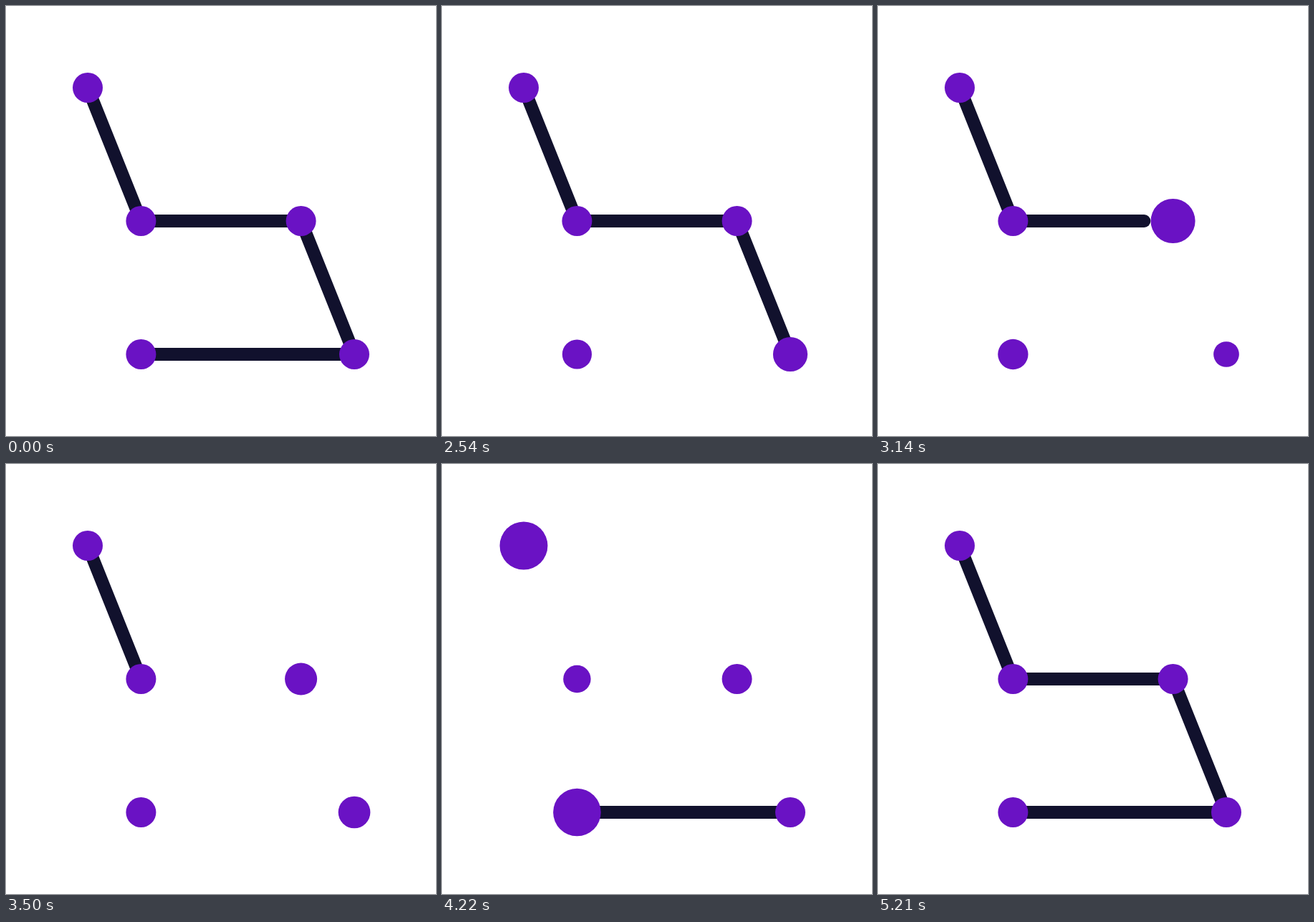
These frames come from a looping animation (600 by 600 pixels, 5.24 s). An HTML page with a canvas:

```html
<!DOCTYPE html>
<html lang="en">
<head>
<meta charset="utf-8">
<title>Linked dots</title>
<style>
  html, body { margin: 0; width: 100%; height: 100%; overflow: hidden; background: #fff; }
  canvas { display: block; width: 600px; height: 600px; }
</style>
</head>
<body>
<canvas id="stage" width="600" height="600"></canvas>
<script>
const ctx = document.getElementById('stage').getContext('2d');

const LOOP = 5240, HOLD = 2030, STEP = 30;
const RADIUS = 21, WIDTH = 18;
const DOT = '#6a12c4', LINE = '#11112d';

const nodes = [[188.4, 486], [486, 486], [411.6, 300], [188.4, 300], [114, 114]];
const pulseStarts = [[2007, 4010], [2507], [3003], [3505], [3945]];
const ERASE_TIME = 385;
const DRAW_START = 4005, DRAW_TIME = 700;

// Pulse keys: age in ms, scale
const pulse = [[0, 1], [250, 1.6], [640, 0.85], [860, 1.1], [1190, 1]];

const clamp = p => Math.min(1, Math.max(0, p));
const mix = (a, b, p) => a + (b - a) * p;
const quadOut = p => p * (2 - p);
const sineInOut = p => (1 - Math.cos(Math.PI * p)) / 2;
const cubicInOut = p => p < 0.5 ? 4 * p ** 3 : 1 - 4 * (1 - p) ** 3;

const segments = nodes.slice(1).map((b, i) => {
  const a = nodes[i];
  return { a, b, length: Math.hypot(b[0] - a[0], b[1] - a[1]) };
});
const total = segments.reduce((sum, s) => sum + s.length, 0);

function scaleAt(age) {
  const i = pulse.findIndex(key => key[0] > age);
  if (i < 1) return 1;
  const [t0, s0] = pulse[i - 1], [t1, s1] = pulse[i];
  const p = (age - t0) / (t1 - t0);
  return mix(s0, s1, i === 1 ? quadOut(p) : sineInOut(p));
}

function drawPart({ a, b }, from, to) {
  if (to <= from) return;
  ctx.beginPath();
  for (const p of [from, to]) ctx.lineTo(mix(a[0], b[0], p), mix(a[1], b[1], p));
  ctx.stroke();
}

function render(t) {
  ctx.fillStyle = '#fff';
  ctx.fillRect(0, 0, 600, 600);

  ctx.strokeStyle = LINE;
  ctx.lineWidth = WIDTH;
  ctx.lineCap = 'round';
  let reach = clamp((t - DRAW_START) / DRAW_TIME) * total;
  segments.forEach((s, i) => {
    if (t < DRAW_START) {
      drawPart(s, cubicInOut(clamp((t - pulseStarts[i][0]) / ERASE_TIME)), 1);
    } else {
      drawPart(s, 0, clamp(reach / s.length));
      reach -= s.length;
    }
  });

  ctx.fillStyle = DOT;
  nodes.forEach(([x, y], i) => {
    const start = pulseStarts[i].filter(s => s <= t).pop() ?? Infinity;
    ctx.beginPath();
    ctx.arc(x, y, RADIUS * scaleAt(t - start), 0, 2 * Math.PI);
    ctx.fill();
  });
}

const origin = performance.now();
function tick() {
  const t = (performance.now() - origin) % LOOP;
  render(t < HOLD ? 0 : HOLD + STEP * Math.floor((t - HOLD) / STEP));
  requestAnimationFrame(tick);
}
tick();
</script>
</body>
</html>
```
